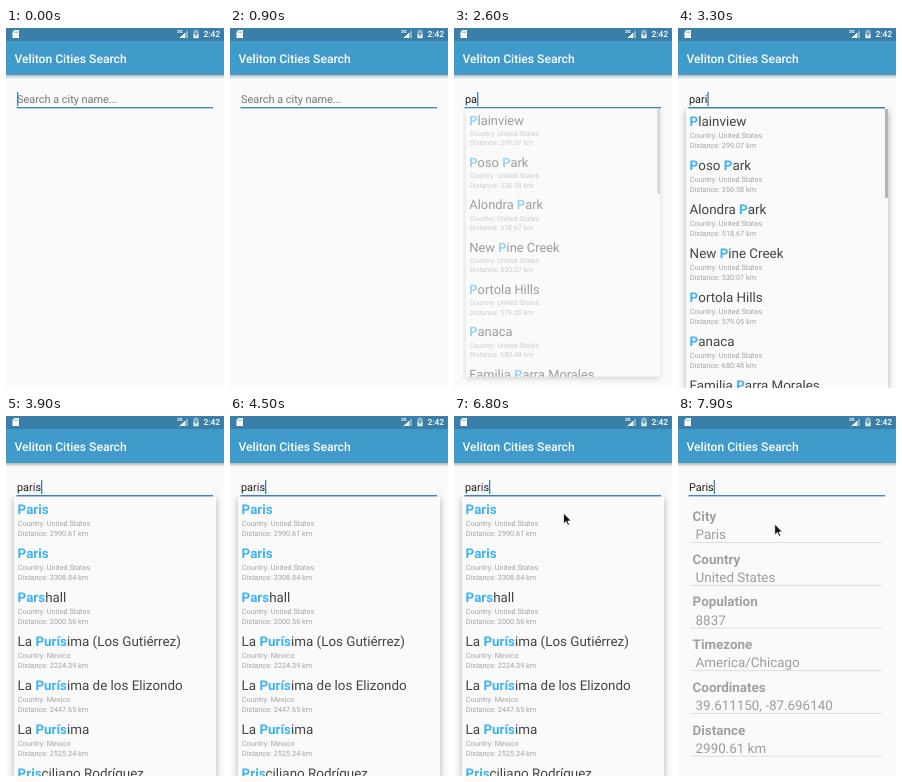
Write an HTML page that moves like this. It is 218 px wide and 360 px high and loops after 8000 ms.

```html
<!DOCTYPE html>
<html lang="en">
<head>
<meta charset="utf-8">
<title>Cities Search</title>
<style>
  html, body { margin: 0; width: 100%; height: 100%; overflow: hidden; background: #fafafa; }
  svg { display: block; width: 218px; height: 360px; font-family: Roboto, sans-serif; }
  text { white-space: pre; text-rendering: geometricPrecision; }
  .bar { font-size: 12.1px; font-weight: 500; fill: #fff; }
  .clock { font-size: 8.5px; font-weight: 500; fill: #fff; }
  .input { font-size: 10.9px; }
  .big { font-size: 13.4px; fill: #434343; }
  .hit { font-weight: 700; fill: #3cb4f2; }
  .small { font-size: 7.3px; fill: #a2a2a2; }
  .label { font-size: 13.4px; font-weight: 700; fill: #a0a0a0; }
  .value { font-size: 13.4px; fill: #9c9c9c; }
  .sheet { filter: drop-shadow(0 2px 3px rgba(0, 0, 0, .3)); }
</style>
</head>
<body>
<svg id="stage" viewBox="0 0 218 360">
  <defs>
    <linearGradient id="shade" x2="0" y2="1">
      <stop offset="0" stop-color="#000" stop-opacity=".25"/>
      <stop offset="1" stop-color="#000" stop-opacity="0"/>
    </linearGradient>
    <clipPath id="window"><rect x="8" y="81" width="202" height="279"/></clipPath>
  </defs>
  <rect width="218" height="360" fill="#fafafa"/>

  <rect y="47" width="218" height="4" fill="url(#shade)"/>
  <rect y="13" width="218" height="34" fill="#409bcb"/>
  <rect width="218" height="13" fill="#397fa7"/>
  <path d="M8.5 2H13V10H6.5V4Z" fill="#fff"/>
  <path d="M8.6 3.4v1.6M10 3.4v1.6M11.4 3.4v1.6" stroke="#397fa7" stroke-width=".6"/>
  <text x="171" y="5.2" font-size="4.5" font-weight="700" fill="#fff">3G</text>
  <path d="M182 2V10H173.5Z" fill="#fff" fill-opacity=".4"/>
  <path d="M179 5V10H173.5Z" fill="#fff"/>
  <path d="M189 1.6h2v1h1.6V6h-5.2V2.6H189Z" fill="#fff" fill-opacity=".45"/>
  <path d="M187.4 6h5.2v4.2h-5.2Z" fill="#fff" fill-opacity=".9"/>
  <path d="M190.4 4l-1.7 3h1.1v2l1.6-3h-1Z" fill="#397fa7"/>
  <text class="clock" x="197.4" y="9.1">2:42</text>
  <text class="bar" x="8.5" y="34.7">Veliton Cities Search</text>

  <g id="details"></g>
  <text class="input" id="query" x="11" y="75"></text>
  <rect id="caret" y="64" width="1.3" height="14" fill="#3484b2"/>
  <rect x="10.5" y="79" width="196.5" height="1.4" fill="#3b8ab5"/>

  <g id="popup">
    <rect class="sheet" x="8" y="81" width="202" height="279" fill="#fafafa"/>
    <g clip-path="url(#window)">
      <g id="early"></g>
      <g id="final"></g>
      <rect id="thumb" x="207" y="81" width="3" height="89" fill="#b4b4b4"/>
    </g>
  </g>
  <path id="mouse" d="M0 0V11L2.6 8.6L4.3 12.4L6 11.6L4.3 8H7.8Z"
        fill="#111" stroke="#fff" stroke-width=".8"/>
</svg>
<script>
const LOOP = 8000;
const $ = id => document.getElementById(id);
const clamp = x => Math.min(1, Math.max(0, x));
const span = (t, a, b) => clamp((t - a) / (b - a));
const mix = (a, b, k) => a + (b - a) * k;
const ease = k => k * k * (3 - 2 * k);

function add(parent, tag, attrs, content = '') {
  const el = document.createElementNS('http://www.w3.org/2000/svg', tag);
  for (const k in attrs) el.setAttribute(k, attrs[k]);
  el.textContent = content;
  parent.appendChild(el);
  return el;
}

// Matched parts of a city name are wrapped in asterisks.
function fillList(group, rows) {
  rows.forEach(([name, country, km], i) => {
    const y = 98.1 + i * 44;
    const title = add(group, 'text', { class: 'big', x: 11.6, y });
    name.split('*').forEach((part, j) => {
      if (part) add(title, 'tspan', j % 2 ? { class: 'hit' } : {}, part);
    });
    add(group, 'text', { class: 'small', x: 11.8, y: y + 11.7 }, 'Country: ' + country);
    add(group, 'text', { class: 'small', x: 11.8, y: y + 21.4 }, 'Distance: ' + km + ' km');
  });
}

const US = 'United States', MX = 'Mexico';
fillList($('early'), [
  ['*P*lainview', US, '299.07'],
  ['*P*oso *P*ark', US, '356.58'],
  ['Alondra *P*ark', US, '518.67'],
  ['New *P*ine Creek', US, '530.07'],
  ['*P*ortola Hills', US, '579.05'],
  ['*P*anaca', US, '680.48'],
  ['Familia *P*arra Morales', MX, '702.13']
]);
fillList($('final'), [
  ['*Paris*', US, '2990.61'],
  ['*Paris*', US, '3308.84'],
  ['*Pars*hall', US, '2000.56'],
  ['La *Purís*ima (Los Gutiérrez)', MX, '2224.39'],
  ['La *Purís*ima de los Elizondo', MX, '2447.65'],
  ['La *Purís*ima', MX, '2525.24'],
  ['*Pris*ciliano Rodríguez', MX, '2551.08']
]);

[
  ['City', 'Paris'],
  ['Country', US],
  ['Population', '8837'],
  ['Timezone', 'America/Chicago'],
  ['Coordinates', '39.611150, -87.696140'],
  ['Distance', '2990.61 km']
].forEach(([label, value], i) => {
  const y = 105 + i * 42.7;
  add($('details'), 'text', { class: 'label', x: 14.6, y }, label);
  add($('details'), 'text', { class: 'value', x: 17.6, y: y + 18.2 }, value);
  add($('details'), 'rect', { x: 13, y: y + 21.2, width: 191, height: .8, fill: '#d6d6d6' });
});

const PICK = 7450;
const typed = [
  [0, ''], [2200, 'p'], [2400, 'pa'], [2900, 'par'],
  [3200, 'pari'], [3500, 'paris'], [PICK, 'Paris']
];
const show = (el, on) => el.setAttribute('visibility', on ? 'inherit' : 'hidden');

function drawField(t) {
  const [since, word] = typed.filter(k => k[0] <= t).pop();
  const query = $('query');
  query.textContent = word || 'Search a city name...';
  query.setAttribute('fill', word ? '#1c1c1c' : '#757575');
  $('caret').setAttribute('x', 11 + (word ? query.getComputedTextLength() : 0));
  show($('caret'), (t - since) % 1000 < 500);
}

function drawPopup(t) {
  const enter = span(t, 2500, 2700);
  const alpha = enter * (1 - span(t, PICK, PICK + 150));
  const s = mix(.924, 1, enter);
  const popup = $('popup');
  show(popup, alpha > 0);
  popup.setAttribute('opacity', alpha);
  popup.setAttribute('transform', `translate(109 60) scale(${s}) translate(-109 -60)`);
  show($('early'), t < 3800);
  show($('final'), t >= 3800);
  $('thumb').setAttribute('opacity', 1 - span(t, 3400, 3650));
}

function drawMouse(t) {
  const a = 1 - (1 - span(t, 6200, 6700)) ** 2;
  const b = ease(span(t, 6850, 7200));
  const x = mix(mix(-12, 109.5, a), 96.7, b);
  const y = mix(mix(160, 97, a), 108, b);
  show($('mouse'), t >= 6200);
  $('mouse').setAttribute('transform', `translate(${x} ${y})`);
}

function draw(t) {
  drawField(t);
  drawPopup(t);
  drawMouse(t);
  show($('details'), t >= PICK);
}

const start = performance.now();
function tick() {
  draw((performance.now() - start) % LOOP);
  requestAnimationFrame(tick);
}
tick();
</script>
</body>
</html>
```
